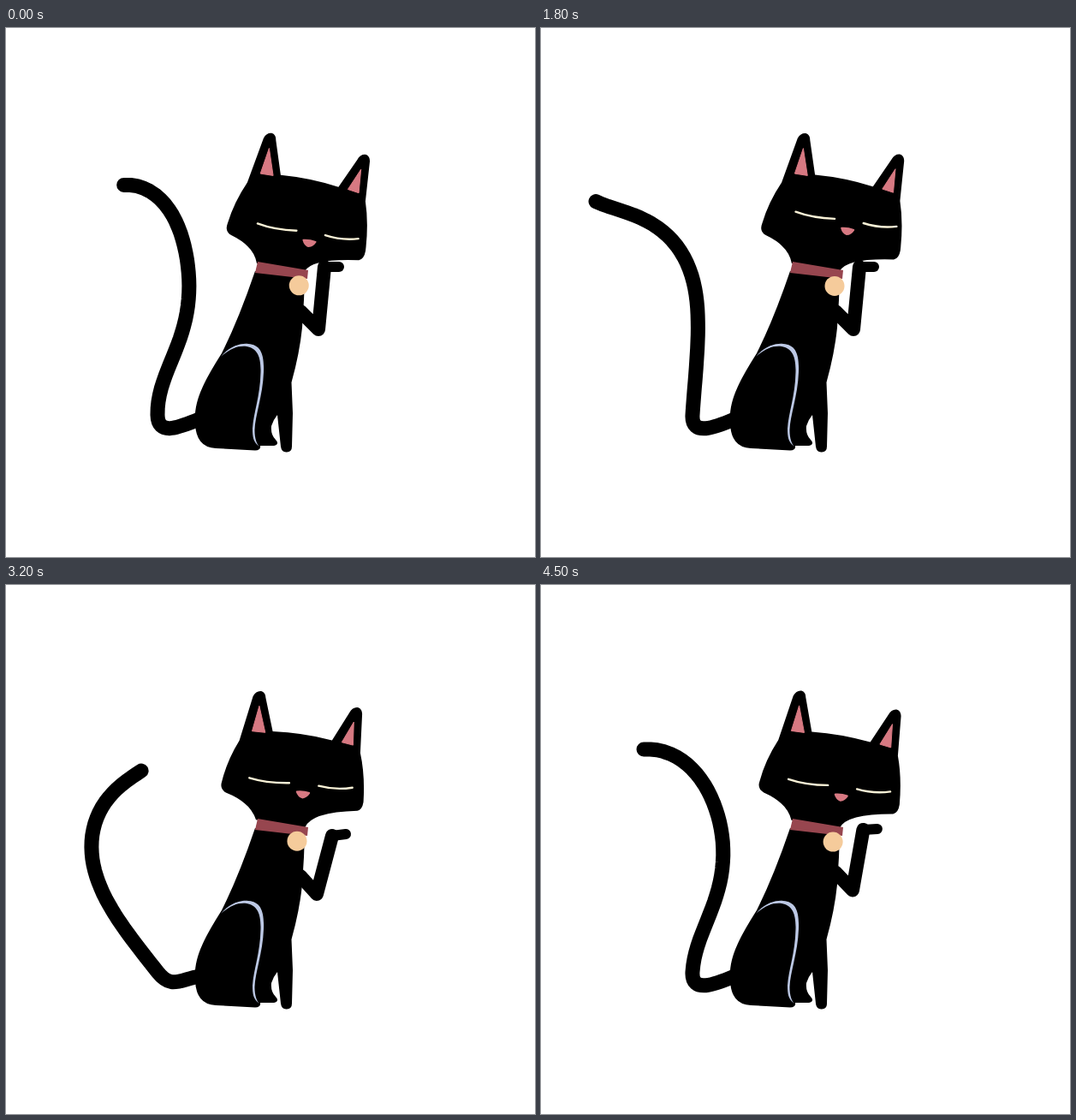
Animation of 618 by 618 pixels, one loop 4600 ms. Source, as an HTML page:

```html
<!DOCTYPE html>
<html lang="en">
<head>
<meta charset="utf-8">
<title>Black cat</title>
<style>
  html, body { margin: 0; width: 100%; height: 100%; overflow: hidden; background: #fff; }
  svg { display: block; width: 100vw; height: 100vh; }
  .limb { fill: none; stroke: #000; stroke-linecap: round; stroke-linejoin: round; }
  .pink { fill: #d77982; stroke: #d77982; stroke-linejoin: round; }
  .lid { fill: none; stroke: #f8f1d6; stroke-width: 2.4; stroke-linecap: round; }
</style>
</head>
<body>
<svg viewBox="0 0 618 618">
  <path id="tail" class="limb" stroke-width="17"/>
  <path d="M291 284Q272 340 252 380C232 412 219 435 221 462Q222 490 245 491L291 493.500Q298 493 297 488L313 488Q320 486 315 481Q309 475 310 465Q312 458 317 452L321 489Q322 496 328 495.500Q334 495 334 489L335 450L333.500 414Q343 380 346 350L348 318L349 290Z"/>
  <path id="arm" class="limb" stroke-width="16"/>
  <path id="paw" class="limb" stroke-width="12"/>
  <path id="head"/>
  <path fill="#bcc8e4" d="M251 384C262 371 275 368 283 369C297 370 302 380 301 402C300 430 291 452 290.500 470C290.500 480 293 486 296 489C289 484 288 478 288 468C289 450 297 430 297.500 402C298 383 293 374 281 372C270 371 262 375 251 384Z"/>
  <path id="collar" fill="#97464f" d="M290 273L349 283L348 293L287 286Z"/>
  <circle id="bell" r="11.500" fill="#f5cb9b"/>
  <path id="ears" class="pink"/>
  <path id="nose" class="pink" stroke-width="2"/>
  <path id="lids" class="lid"/>
  <path id="eyes" fill="#fbf5d9"/>
</svg>
<script>
const LOOP = 4600, STEP = 100, TAU = 2 * Math.PI;
const $ = id => document.getElementById(id);
const draw = (id, d) => $(id).setAttribute('d', d);
const clamp = v => Math.max(0, Math.min(1, v));
const lerp = (a, b, k) => a + (b - a) * k;
const rad = deg => deg * Math.PI / 180;
const xy = (x, y) => x.toFixed(1) + ',' + y.toFixed(1);

// The head as seen from the front; warping it gives every other pose
const HEAD = 'M290,273Q277,252 246,244Q237,241 239,232Q242,208 254,184L264,133'
  + 'C267,124.5 278,123.5 279.5,133L293,170Q330,168 366,173L383,140'
  + 'C386,131.5 397,130.5 398.5,140L402,184Q411,208 413,238Q413,247 407,249Q352,258 349,283Z';
const EARS = 'M273,143L268,172L284,172ZM389.5,150L378,174L392,176Z';
const NOSE = 'M328.5,231Q336,229.5 343.5,231Q341,236 336,237Q331,236 328.5,231Z';
const LIDS = 'M269,221Q291,225 318,222M354,222Q375,225 395,220';
const EYES = 'M269,221Q278,208 284,205Q292,203 295,208L295,222Q281,222 269,221Z'
  + 'M309,223L311,215Q316,219 318,222ZM354,222Q361,213 372,210L372,223Q362,223 354,222Z'
  + 'M387,223L387,209Q393,214 395,219L394,222Z';

// Shoulder, elbow, wrist, paw
const ARM = {
  front: [[341, 350], [347.5, 420], [349, 470], [349, 484]],
  turn: [[344, 340], [363, 361], [381, 293], [397, 291]],
  rest: [[344, 331], [365, 352], [372, 279], [389, 279]]
};

// 0 faces front, 1 is half turned, 2 leans on the paw
const TURN = [[0, 1.75], [150, 2], [2950, 2], [3200, 1], [3600, .35],
              [3850, 0], [4150, 0], [4400, 1], [LOOP, 1.75]];

function turnAt(t) {
  const i = TURN.findIndex(key => key[0] > t);
  const [t0, v0] = TURN[i - 1], [t1, v1] = TURN[i];
  return lerp(v0, v1, (t - t0) / (t1 - t0));
}

const mapPath = (path, move) =>
  path.replace(/([\d.]+),([\d.]+)/g, (_, x, y) => xy(...move(+x, +y)));

// Tilt and narrow the head by k; the neck stays in place
function tilt(k) {
  return (x, y) => {
    const w = k * clamp((285 - y) / 35);
    return [x + w * (31 - .21 * (y - 184) - .075 * (x - 254)),
            y + w * (.165 * (x - 268) + .05 * (y - 215))];
  };
}

// A wave of headings runs along the tail; the second sway is a little slower
function tailPath(t) {
  const SWAY = 2170;
  const phase = TAU * (t < SWAY ? t / SWAY : (t - SWAY) / (LOOP - SWAY));
  const heading = s => rad(97 + 2 * (s - 2) ** 2
    + (28 + .13 * s ** 4) * Math.cos(phase - rad(138 + 49 * s))
    - 10 * Math.cos(s * Math.PI / 2) * Math.cos(2 * phase - rad(10)));
  const unit = 59.5 + 3.5 * Math.cos(phase - rad(330));
  const ds = .125;
  let x = 177, y = 452;

  const up = heading(-.5), out = rad(187) + (rad(139) - up) * .3;
  let d = `M226,457C${xy(226 + 24 * Math.cos(out), 457 - 24 * Math.sin(out))} `
    + `${xy(x - 26 * Math.cos(up), y + 26 * Math.sin(up))} ${xy(x, y)}`;
  for (let s = -.5; s < 4.5; s += ds) {
    const a = heading(s + ds / 2);
    x += unit * ds * Math.cos(a);
    y -= unit * ds * Math.sin(a);
    d += 'L' + xy(x, y);
  }
  return d;
}

function armPoints(turn) {
  const [from, to, k] = turn < 1
    ? [ARM.front, ARM.turn, turn]
    : [ARM.turn, ARM.rest, clamp((turn - 1) * 1.35)];
  return from.map((p, i) => xy(lerp(p[0], to[i][0], k), lerp(p[1], to[i][1], k)));
}

function render(t) {
  const turn = turnAt(t), half = Math.min(turn, 1), lean = clamp(turn - 1);
  const calm = clamp(t / 300) * clamp((3200 - t) / 250);
  const rub = 1 - calm * (.1 + 1.1 * Math.cos(TAU * (t - 1160) / 590));

  const headMove = tilt(.6 * half + (.28 + .12 * rub) * lean);
  const shiftX = 2 * half + lean * (7 - 3 * rub);
  const shiftY = 4 * half + lean * (14 * rub - 10);
  const faceMove = (x, y) => {
    const p = headMove(x, y);
    return [p[0] + shiftX, p[1] + shiftY];
  };
  const open = clamp((.6 - turn) / .4);

  draw('tail', tailPath(t));
  const [shoulder, elbow, wrist, paw] = armPoints(turn);
  draw('arm', `M${shoulder}L${elbow}L${wrist}`);
  draw('paw', `M${wrist}L${paw}`);

  draw('head', mapPath(HEAD, headMove));
  draw('ears', mapPath(EARS, headMove));
  draw('nose', mapPath(NOSE, faceMove));
  draw('lids', open > .1 ? '' : mapPath(LIDS, faceMove));
  draw('eyes', open > .1 ? mapPath(EYES, (x, y) => faceMove(x, lerp(222, y, open))) : '');

  $('collar').setAttribute('transform', `translate(${4 * half})`);
  $('bell').setAttribute('cx', 337 + 3 * turn);
  $('bell').setAttribute('cy', 297 + 2.2 * turn);
}

const start = performance.now();
function tick() {
  const t = (performance.now() - start) % LOOP;
  render(Math.floor(t / STEP) * STEP);
  requestAnimationFrame(tick);
}
tick();
</script>
</body>
</html>
```
